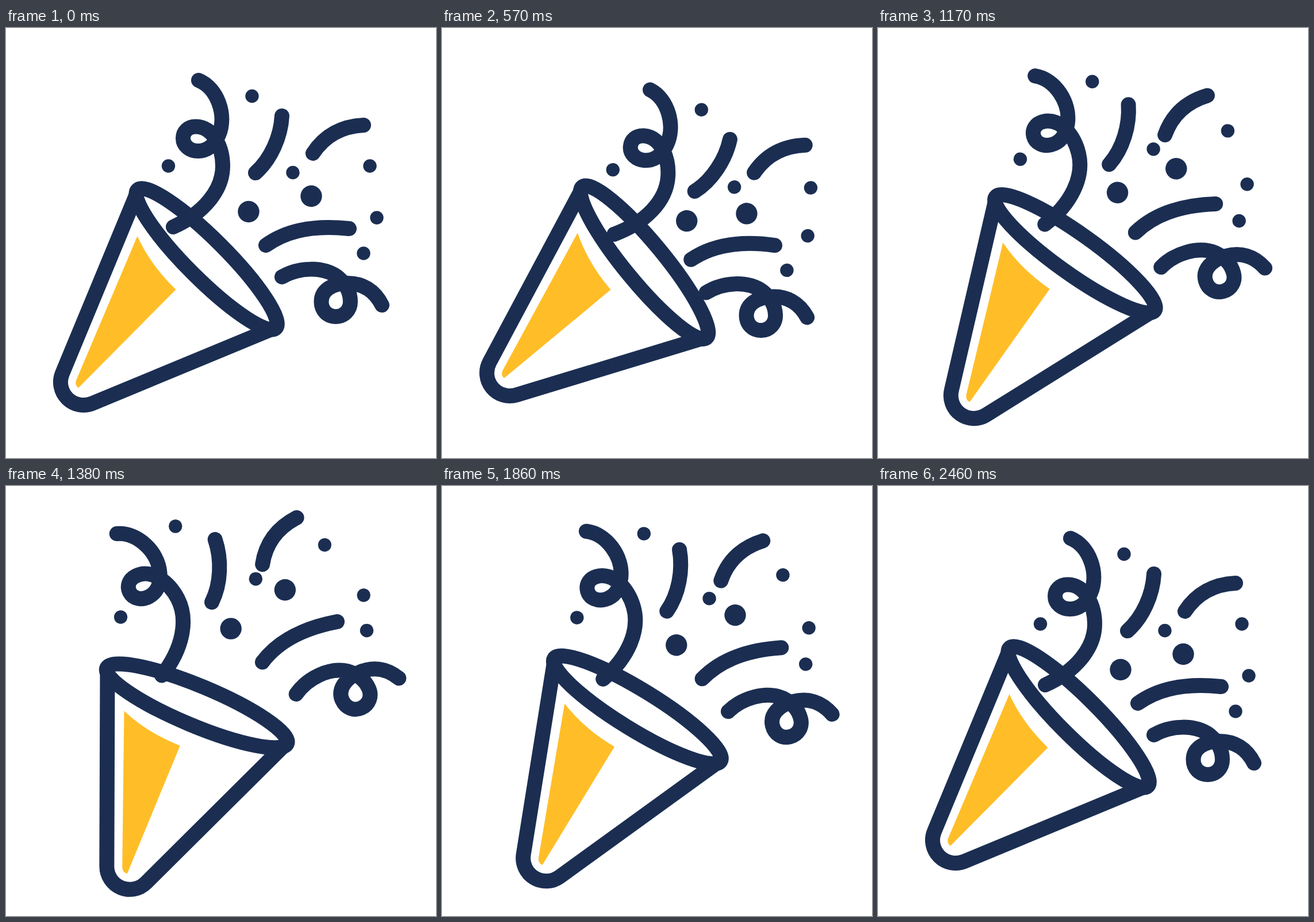
Recreate the animation shown at these times as an HTML page. Size 748x748 px, loop 2730 ms.

```html
<!DOCTYPE html>
<html lang="en">
<head>
<meta charset="utf-8">
<title>Party popper</title>
<style>
  html, body { margin: 0; width: 100%; height: 100%; overflow: hidden; background: #fff; }
  svg { display: block; width: 100%; height: 100%; }
  .line { fill: none; stroke: #1b2e52; stroke-width: 26; stroke-linecap: round; stroke-linejoin: round; }
  .dot { fill: #1b2e52; }
</style>
</head>
<body>
<svg viewBox="0 0 748 748" xmlns="http://www.w3.org/2000/svg">
  <g id="popper">
    <path fill="#ffbe28" d="M228.500 362Q251 412 295.500 455L126 626Q119.500 622 122 613Z"/>
    <path class="line" d="M230 282L98 600.700A40 40 0 0 0 150.300 653L469 521"/>
    <ellipse class="line" cx="349.100" cy="401.900" rx="170" ry="34.500" transform="rotate(45 349.100 401.900)"/>
    <g id="confetti"></g>
  </g>
</svg>
<script>
const LOOP = 2730, STEP = 30, PIVOT = '291 435';
const popper = document.getElementById('popper');
const confetti = document.getElementById('confetti');

// in / out: [dx, dy, turn] when pulled back and when thrown out
const streamers = [
  { d: 'M335 91C367 104 385 151 370 186C362 206 348 214 334 214C320 214 308 205 308 192C308 180 317 171.500 330 171.500C362 171.500 377 210 377 240C377 282 344 322 291 346',
    c: [313, 218], in: [-3.5, 19.5, -2.3], out: [11, -20, -5.3] },
  { d: 'M480 153C478 189 461 228 434 252',
    c: [457, 202], in: [-11, 33, 6], out: [9, -9.5, 0] },
  { d: 'M534 218C553 189 582 171 622 169',
    c: [578, 193], in: [-20.3, 10.5, -8], out: [15, -3, -2] },
  { d: 'M452 378C488 352 535 342 597 349',
    c: [524, 363], in: [-39.5, 10.4, -6.5], out: [37, 3, 6] },
  { d: 'M480 433C509 416 552 414 578 434C592 446 599 460 599 476C599 491 588 502 573.500 502C559 502 548.500 491 548.500 476C548.500 456 568 444 594 444C620 444 641 456 654 482',
    c: [573, 474], in: [-23.5, -3, -12.5], out: [42, 13, -1.5] }
];
const dots = [
  { r: 11.7, c: [428, 118.5], in: [-10, 15.7, 0], out: [6, -22, 0] },
  { r: 11.7, c: [282.5, 240], in: [-6, 11.5, 0], out: [3, -34, 0] },
  { r: 11.7, c: [499, 251.5], in: [-11.4, 8, 0], out: [31, -16.5, 0] },
  { r: 11.7, c: [633, 240], in: [-14.2, 7.6, 0], out: [30.7, -14, 0] },
  { r: 11.7, c: [645, 330], in: [-29.3, -3, 0], out: [50.3, 4.5, 0] },
  { r: 11.7, c: [622, 392], in: [-41.3, -1, 0], out: [56, 1, 0] },
  { r: 18.7, c: [422, 319.5], in: [-11, 5.6, 0], out: [35.5, -21, 0] },
  { r: 18.7, c: [531, 292.5], in: [-21.8, 12.6, 0], out: [40.2, -21, 0] }
];

function add(tag, attrs) {
  const el = document.createElementNS('http://www.w3.org/2000/svg', tag);
  for (const k in attrs) el.setAttribute(k, attrs[k]);
  return confetti.appendChild(el);
}
for (const s of streamers) s.el = add('path', { class: 'line', d: s.d });
for (const o of dots) o.el = add('circle', { class: 'dot', cx: o.c[0], cy: o.c[1], r: o.r });
const pieces = streamers.concat(dots);

// cubic-bezier(a, 0, b, 1)
function ease(x, a, b) {
  if (x <= 0) return 0;
  if (x >= 1) return 1;
  let lo = 0, hi = 1, s = 0.5;
  for (let i = 0; i < 30; i++) {
    s = (lo + hi) / 2;
    const v = 1 - s;
    if (3 * v * v * s * a + 3 * v * s * s * b + s * s * s < x) lo = s; else hi = s;
  }
  return s * s * (3 - 2 * s);
}

// Weights of the pulled-back and thrown-out poses
function weights(t, peak) {
  const wind = ease((t - 180) / (peak - 180), 0.7, 0.7);
  const fire = ease((t - peak) / (1560 - peak), 0.5, 0.43);
  const rest = ease((t - 1560) / 900, 0.4, 0.2);
  return [wind * (1 - fire), fire * (1 - rest)];
}

function draw(t) {
  const [back, fwd] = weights(t, 770);
  popper.setAttribute('transform', `rotate(${10.7 * back - 24.7 * fwd} ${PIVOT})`);
  const [pull, push] = weights(t, 738);
  for (const p of pieces) {
    const [x, y, turn] = p.in.map((v, i) => v * pull + p.out[i] * push);
    p.el.setAttribute('transform', `translate(${x} ${y}) rotate(${turn} ${p.c[0]} ${p.c[1]})`);
  }
}

const start = performance.now();
function tick() {
  const t = (performance.now() - start) % LOOP;
  draw(Math.floor(t / STEP) * STEP);
  requestAnimationFrame(tick);
}
draw(0);
requestAnimationFrame(tick);
</script>
</body>
</html>
```
